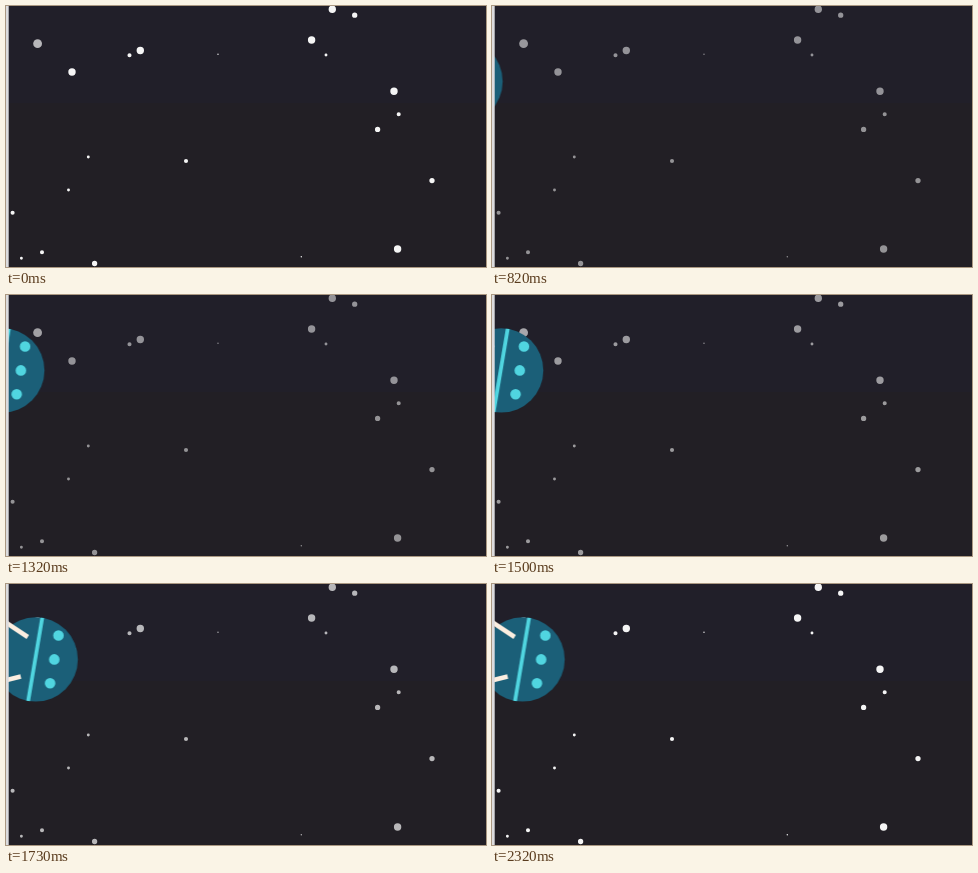
An HTML page that plays this animation: 480 px wide and 261 px high, repeating every 2.37 s.

```html
<!DOCTYPE html>
<html lang="en">
<head>
<meta charset="utf-8">
<title>Planet drifting in</title>
<style>
  html, body { margin: 0; width: 100%; height: 100%; overflow: hidden; background: #221f25; }
  svg { display: block; width: 100%; height: 100%; }
  path { fill: none; }
  .dots { stroke-linecap: round; }
  #stars, #near, #planet { animation: 2370ms linear infinite; }
  #stars { stroke: #fff; animation-name: twinkle; }
  #near { fill: #fff; animation-name: glow; }
  #planet { animation-name: drift; }

  @keyframes twinkle {
    0% { opacity: .96; animation-timing-function: ease-out }
    25%, 55% { opacity: .52; animation-timing-function: ease-in-out }
    98%, 100% { opacity: .96 }
  }
  @keyframes glow {
    0%, 100% { opacity: .68; animation-timing-function: ease-in-out }
    42% { opacity: .53; animation-timing-function: ease-out }
  }
  /* waits off stage, speeds up, overshoots, settles */
  @keyframes drift {
    0% { transform: translateX(-60px); animation-timing-function: step-end }
    28.7% { transform: translateX(-38.7px); animation-timing-function: cubic-bezier(.33, .26, .67, .48) }
    74% { transform: translateX(32px); animation-timing-function: ease-out }
    80% { transform: translateX(33.7px); animation-timing-function: ease-in-out }
    98%, 100% { transform: translateX(30.5px) }
  }
</style>
</head>
<body>
<svg viewBox="0 0 480 261" preserveAspectRatio="none">
  <defs>
    <clipPath id="disc"><circle cy="75.4" r="42.2"/></clipPath>
  </defs>
  <rect width="480" height="261" fill="#221f25"/>
  <rect width="480" height="97" fill="#211f29"/>

  <!-- one path of round dots per star size -->
  <g id="stars" class="dots">
    <path stroke-width="7.4" d="M66 66h0M134.3 44.5h0M326.3 3.2h0M305.6 34h0M388 85.3h0M391.6 243h0"/>
    <path stroke-width="5.3" d="M348.7 9.2h0M371.6 123.4h0M426 174.6h0M88.6 257.5h0"/>
    <path stroke-width="4.1" d="M123.5 49.3h0M392.7 108.2h0M180 155h0M6.6 206.7h0M36 246.3h0"/>
    <path stroke-width="2.9" d="M320 49h0M82.3 151h0M62.5 184h0M15.4 252.3h0"/>
    <path stroke-width="1.4" d="M212 48.2h0M295.3 250.7h0"/>
  </g>
  <circle id="near" cx="31.6" cy="37.7" r="4.4"/>

  <g id="planet">
    <circle cy="75.4" r="42.2" fill="#1b5f78"/>
    <g stroke="#50d5e0">
      <path class="dots" stroke-width="10.6" d="M22.8 51.5h0m-4.2 23.9h0m-4.2 23.9h0"/>
      <path stroke-width="3.8" clip-path="url(#disc)" d="M7.2 30L-8.2 121"/>
    </g>
    <path stroke="#fbeee0" stroke-width="4.5" d="M-44 29.2L-7.9 53M-44 99.8L-14.9 92.5"/>
  </g>
  <rect width="2.7" height="261" fill="#dcdcde"/>
</svg>
</body>
</html>
```
